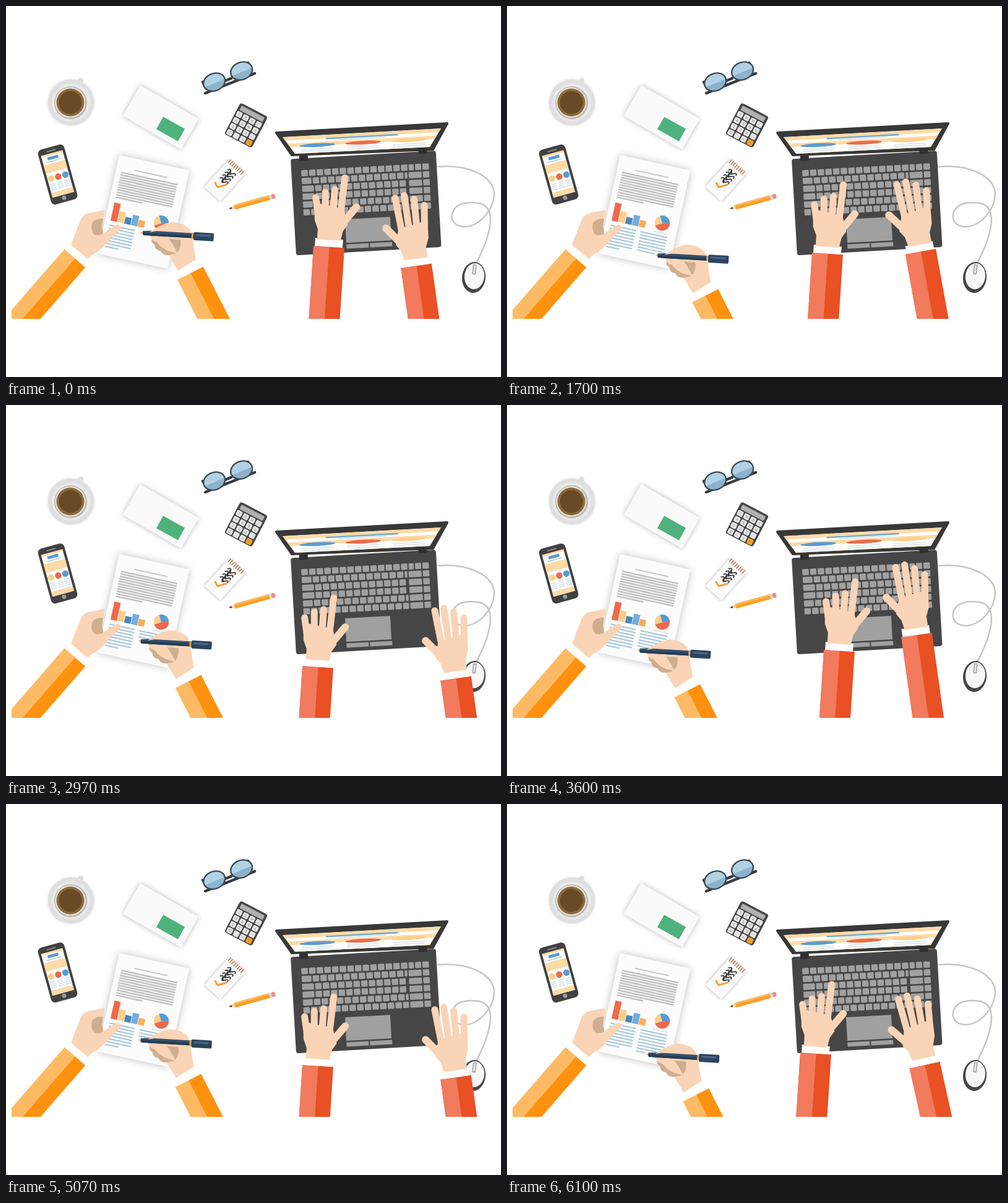
An HTML page with a canvas for the animation above (6.31 s loop, 800 by 600 pixels).

```html
<!DOCTYPE html>
<html lang="en">
<head>
<meta charset="utf-8">
<title>Desk work</title>
<style>
html, body { margin: 0; width: 100%; height: 100%; overflow: hidden; background: #fff; }
canvas { display: block; width: 800px; height: 600px; }
</style>
</head>
<body>
<canvas id="stage" width="800" height="600"></canvas>
<script>
const ctx = document.getElementById('stage').getContext('2d');
const LOOP = 6310, CYCLE = 2100, STEPS = 10;

const SKIN = '#fad4b6', SHADE = '#cfae90', INK = '#464646', KEY = '#a0a0a0';
const PEACH = '#fddba6', RED = '#ee6a4c', BLUE = '#5b9bd0', YELLOW = '#fcd08a';
const ORANGE = ['#fdba64', '#fe910d'], SCARLET = ['#f27a5d', '#e95024'];

// Key poses: step, lines written, left hand x/y, right hand x/y/turn
const KEYS = [
  [0, 0, 0, 0, 0, 0, 0],
  [1, 1.88, -12, 44, -4, -29, 0],
  [4, 3, -18, 34, 64, 22, 0],
  [7, 6, 15, 8, -1, -48, 0],
  [9, 7.35, -23, 14, 12, 2, -4.5]
];

function pose(step) {
  const n = Math.max(1, KEYS.findIndex(k => k[0] >= step));
  const a = KEYS[n - 1], b = KEYS[n], u = (step - a[0]) / (b[0] - a[0]);
  return a.map((v, i) => v + (b[i] - v) * u);
}

// Every third step is held a little longer
const stepStart = i => 200 * i + 30 * Math.ceil(i / 3);

function shape(color, d) {
  ctx.fillStyle = color;
  ctx.fill(new Path2D(d));
}

function line(color, width, d) {
  ctx.strokeStyle = color;
  ctx.lineWidth = width;
  ctx.lineCap = ctx.lineJoin = 'round';
  ctx.stroke(new Path2D(d));
}

function rect(color, x, y, w, h, r = 0) {
  ctx.fillStyle = color;
  ctx.beginPath();
  ctx.roundRect(x, y, w, h, r);
  ctx.fill();
}

const block = (color, w, h, r) => rect(color, -w / 2, -h / 2, w, h, r);

function oval(color, x, y, rx, ry = rx, turn = 0) {
  ctx.fillStyle = color;
  ctx.beginPath();
  ctx.ellipse(x, y, rx, ry, turn, 0, 7);
  ctx.fill();
}

function at(x, y, deg, draw) {
  ctx.save();
  ctx.translate(x, y);
  ctx.rotate(deg * Math.PI / 180);
  draw();
  ctx.restore();
}

function shadow(color, blur, draw) {
  ctx.save();
  ctx.shadowColor = color;
  ctx.shadowBlur = blur;
  draw();
  ctx.restore();
}

function stripes(color, n, x, y, w, h, gap, last = w) {
  for (let i = 0; i < n; i++) rect(color, x, y + i * gap, i < n - 1 ? w : last, h);
}

function cup() {
  shadow('#d4d4d4', 4, () => oval('#dfdfdf', 105, 156, 37));
  line('#dedede', 8, 'M115 126L121 120');
  oval('#e9e9e9', 105, 156, 31);
  oval('#bab7b4', 104.5, 156.5, 26.5);
  oval('#e6e4e2', 104, 156, 24.5);
  oval('#8d6b38', 104, 156, 22.5);
  oval('#694a27', 104, 156, 18.5);
}

function envelope() {
  at(250, 180, 30, () => shadow('#b8b8b8', 9, () => block('#fafafa', 109, 57)));
  at(266, 199, 29, () => block('#4fb27c', 40, 23));
}

function lens(x, y) {
  at(x, y, -22, () => {
    oval('#b0d2e4', 0, -1, 18, 14);
    ctx.fillStyle = '#8db3cc';
    ctx.beginPath();
    ctx.ellipse(0, -1, 18, 14, 0, .1, 3);
    ctx.fill();
    line('#3f4a55', 2.4, 'M-18 -1A18 14 0 0 1 18 -1A18 14 0 0 1 -18 -1');
  });
}

function glasses() {
  line('#35393f', 4.5, 'M322 141L402 109M318 123L321 128M391 92L394 97M354 121L364 117');
  lens(337, 124);
  lens(381, 106);
}

function calculator() {
  at(388, 193, 27.5, () => {
    block(INK, 50, 57, 4);
    rect('#b0b0b0', -21, -25, 42, 8, 1);
    ctx.font = '6px Arial, "Liberation Sans", sans-serif';
    ctx.textAlign = 'center';
    for (let i = 0; i < 16; i++) {
      const x = -18 + i % 4 * 11.7, y = -10.5 + (i >> 2) * 11;
      rect(i === 15 ? '#f5a21f' : '#e6e6e6', x - 4.8, y - 4.6, 9.6, 9.2, 2);
      ctx.fillStyle = '#777';
      ctx.fillText('789/456x123-0.+='[i], x, y + 2);
    }
  });
}

function phone() {
  at(83.5, 272.5, -15.5, () => {
    block('#414141', 44, 92, 7);
    rect('#858585', -8, -41, 16, 2, 1);
    oval('#9a9a9a', 0, 39, 3.5);
    rect('#fff', -18, -35, 36, 69);
    rect(PEACH, -18, -36, 36, 3);
    rect(BLUE, -9, -31, 18, 5);
    rect('#a9cbe3', -12, -24, 24, 1.5);
    rect(PEACH, -18, -20, 36, 14);
    [YELLOW, RED, BLUE].forEach((c, i) => {
      const x = -12 + i * 12;
      oval(c, x, 3.5, 5.2);
      stripes('#c9dce8', 4, x - 4.5, 12, 9, 1.4, 3);
    });
    rect(PEACH, -18, 26, 36, 8);
  });
}

function sheet(rows, part) {
  const text = '#a3c5d9';
  at(183, 241, 12.4, () => {
    shadow('#bcbcbc', 13, () => rect('#fcfcfc', 0, 0, 116, 163));
    rect('#c9c9c9', 29, 18, 55, 2);
    stripes('#c2c2c2', 11, 9, 25.5, 93, 2.5, 4.1, 44);
    [[RED, 30], [YELLOW, 18], ['#4a86bd', 11], ['#74addb', 17], ['#f9ae57', 11]].forEach(
      ([c, h], i) => rect(c, 9 + i * 11.2, 106.5 - h, 10.4, h));
    [RED, YELLOW, BLUE].forEach((c, i) => {
      ctx.fillStyle = c;
      ctx.beginPath();
      ctx.moveTo(90, 93);
      ctx.arc(90, 93, 12.3, i ? 1 + i * 1.6 : -.25, i < 2 ? 2.6 + i * 1.6 : 6.03);
      ctx.fill();
    });
    rect('#dedede', 78, 108, 25, 1.5);
    stripes(text, 8, 9, 113, 42, 2, 5, 22);
    stripes(text, rows + 1, 59, 113, 44, 2, 5, 44 * part);
  });
}

function notebook() {
  at(353.5, 282, 42, () => {
    shadow('#aaa', 5, () => block('#fafafa', 35, 60));
    for (let x = -15; x < 17; x += 4) line('#c0704a', 1.5, `M${x} -31v6`);
    for (let y = -16; y < 6; y += 6) {
      line('#383838', 1.8, `M-8 ${y}q4 -6 5 0t5 0t5 -1M-3 ${y - 2}l3 5`);
    }
  });
  line('#f4a238', 3, 'M338 286L342 293L356 289');
}

function pencil() {
  at(360, 328, -15.5, () => {
    shape('#f8d3a0', 'M0 0L11 -4V4Z');
    shape('#4b4038', 'M0 0L5 -2V2Z');
    rect('#f9a02a', 10, -4, 60, 8);
    rect('#fbbb5c', 10, -4, 60, 3);
    rect('#d7d7d7', 68, -4, 4, 8);
    rect('#ec8f86', 72, -4, 6, 8, 2);
  });
}

function screen() {
  line('#383838', 4, 'M437 205L713 190L690 232L462 241Z');
  shape('#383838', 'M437 205L713 190L690 232L462 241Z');
  ctx.save();
  ctx.clip(new Path2D('M447 212L703 198L685 228L467 239Z'));
  at(575, 219, -3.1, () => {
    block('#fff', 280, 60);
    for (const y of [-14, -3, 14]) rect(PEACH, -140, y, 280, 6);
    rect('#6aa8cf', -58, -9, 117, 2.4);
    rect('#bcd7e6', -38, -5.5, 78, 1.2);
    [BLUE, RED, YELLOW].forEach((c, i) => {
      const x = -72 + i * 74;
      oval(c, x, 2, 29, 3);
      stripes('#cfdfe8', 2, x - 26, 7.5, 52, 1.3, 3);
    });
  });
  ctx.restore();
}

function keyboard() {
  for (let r = 0; r < 6; r++) {
    const y = r * 12.7, first = 10.5 + 9 * Math.sin(r * Math.PI / 5);
    const wide = r ? 173 : 184;
    const key = (x, w) => rect(KEY, x, y, w, 10, 1.5);
    key(0, first);
    for (let x = first + 2; x < wide - 6; x += 12.4) key(x, Math.min(10.4, wide - 2 - x));
    key(wide, 194 - wide);
    key(196, 10.5);
  }
}

function laptop() {
  screen();
  at(460, 247.5, -3.3, () => {
    rect(INK, 0, 0, 235, 156, 4);
    for (const x of [14, 207]) rect('#303030', x, -5, 14, 9, 1);
  });
  at(477, 265.5, -3.1, keyboard);
  at(548, 345, -3.1, () => {
    rect(KEY, 0, 0, 73, 38);
    for (const x of [0, 38]) rect(KEY, x, 40.5, 36, 7);
  });
}

function mouse() {
  line('#c6c6c6', 2.5, 'M697 260C745 255 790 275 789 305C788 330 765 356 742 357C725 357 717 345 722 333' +
    'C728 319 745 316 765 319C785 324 786 345 779 370C774 390 765 405 758 420');
  oval('#474747', 756, 439, 19, 25, .1);
  oval('#f7f7f7', 757, 437, 16, 21, .1);
  at(757, 426, 6, () => {
    block('#a8a8a8', 6, 17, 2);
    block('#e8e8e8', 2.6, 13, 1);
  });
}

// Sleeve hanging down from the cuff, drawn around the wrist
function arm([light, dark], w) {
  rect(dark, -w / 2, 0, w, 200);
  rect(light, -w / 2, 0, w * .51, 200);
  rect('#fff', 2 - w / 2, -13, w - 5, 13);
}

function holdingHand() {
  at(111.5, 408, 41, () => arm(ORANGE, 44.5));
  shape(SKIN, 'M105 386L119 350Q122 338 133 335L158 330Q161 336 156 344L157 368L176 355Q184 352 186 358' +
    'Q184 363 178 367L161 385Q152 396 140 402L132 409Z');
  shape(SHADE, 'M157 344Q143 343 139 352Q136 362 143 370Q152 372 157 368L155 356Z');
}

function pen() {
  shape('#f0a54d', 'M0 0L7 -3V3Z');
  shape('#34506b', 'M4 -3L18 -4H86V4H18L4 3Z');
  rect('#233c55', 5, 0, 81, 4);
  rect('#e9a24c', 83, -4, 3, 8);
  rect('#2c445e', 86, -6, 33, 13, 2);
  rect('#496a86', 90, -3, 24, 3, 1);
}

function penHand() {
  at(298, 432, -27, () => arm(ORANGE, 46.5));
  shape(SKIN, 'M231 369Q248 353 268 349Q287 350 297 361Q302 373 303 388L307 410L278 428L263 403' +
    'Q252 404 250 396Q240 394 241 387Q233 384 235 376Z');
  shape(SHADE, 'M238 375Q232 380 240 386Q240 394 250 396Q253 403 263 403L273 401Q284 395 282 378Z');
  shape(SKIN, 'M234 372L262 375Q272 388 277 400L264 397Q251 392 244 382Q234 379 234 372Z');
  at(217, 366.5, 3.4, pen);
  shape(SKIN, 'M232 366Q249 353 267 350L271 364L243 364Z');
}

// Fingers run from the little finger to the index finger
function typingHand(side, reach) {
  arm(SCARLET, 50);
  ctx.scale(side, 1);
  shape(SKIN, 'M28 -70L26 -42L20 -28L20 -11H-18L-21 -27L-28 -38L-20 -63Z');
  reach.forEach((r, i) => line(SKIN, 11, `M${26.5 - 15 * i} ${-r}L${21 - 12 * i} -52`));
  line(SKIN, 12, 'M-40 -67L-20 -40');
}

function paint([, written, lx, ly, rx, ry, turn]) {
  const rows = Math.floor(written), part = written - rows;
  rect('#fff', 0, 0, 800, 600);
  cup();
  envelope();
  glasses();
  calculator();
  phone();
  sheet(rows, part);
  notebook();
  pencil();
  laptop();
  mouse();
  ctx.save();
  ctx.beginPath();
  ctx.rect(9, 0, 782, 506);
  ctx.clip();
  holdingHand();
  at(43 * part - 1.1 * rows, 9.5 * part + 5 * rows, 0, penHand);
  at(522 + lx, 389.5 + ly, 3.7, () => typingHand(-1, [78, 88, 93, 113]));
  at(663 + rx, 420 + ry, turn - 8, () => typingHand(1, [95, 107, 115, 113]));
  ctx.restore();
}

let shown = -1;
const begin = performance.now();

function tick() {
  const t = (performance.now() - begin) % LOOP;
  const local = t - Math.min(2, Math.floor(t / CYCLE)) * CYCLE;
  let step = 0;
  while (step < STEPS - 1 && stepStart(step + 1) <= local) step++;
  if (step !== shown) paint(pose(shown = step));
  requestAnimationFrame(tick);
}
tick();
</script>
</body>
</html>
```
